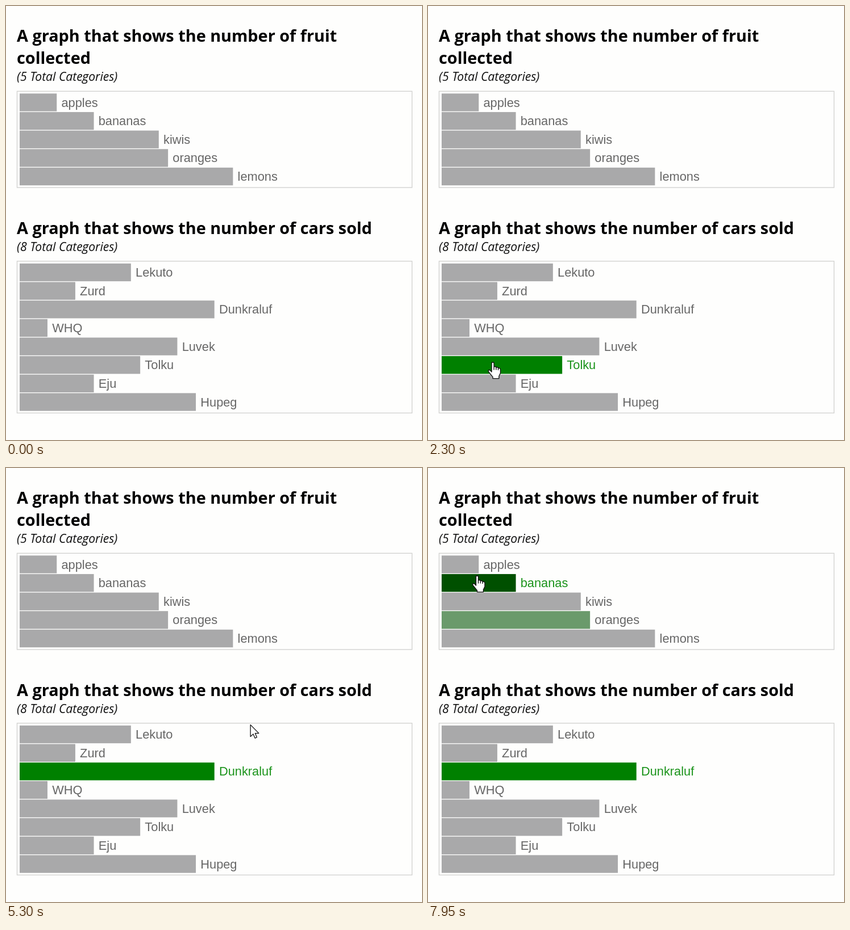
These frames come from a looping animation (732x765 px, 8 s). An HTML page:

```html
<!DOCTYPE html>
<html lang="en">
<head>
<meta charset="utf-8">
<title>Bar charts</title>
<style>
  html, body { margin: 0; width: 100%; height: 100%; overflow: hidden; background: #fefefd; }
  svg { display: block; }
  .title { font: bold 28.84px "Open Sans", "Noto Sans", sans-serif; fill: #000; }
  .sub { font: italic 21.2px "Open Sans", "Noto Sans", sans-serif; fill: #111; }
  .label { font: 21.8px "Liberation Sans", Arial, sans-serif; }
  .frame { fill: none; stroke: #d2d2d0; stroke-width: 1.36; }
  .cursor path { fill: #fff; stroke: #111; stroke-width: 1; stroke-linejoin: round; }
</style>
</head>
<body>
<svg width="732" height="765" viewBox="0 0 732 765">
  <text class="title" x="19" y="63">A graph that shows the number of fruit</text>
  <text class="title" x="19" y="102">collected</text>
  <text class="sub" x="19" y="132">(5 Total Categories)</text>
  <rect class="frame" x="19.5" y="150.3" width="695" height="169.7"/>
  <text class="title" x="19" y="401.5">A graph that shows the number of cars sold</text>
  <text class="sub" x="19" y="431.6">(8 Total Categories)</text>
  <rect class="frame" x="19.5" y="449.8" width="695" height="267.6"/>
  <g id="rows"></g>
  <g id="hand" class="cursor">
    <path transform="scale(1.36) translate(-6.5 -.5)" d="M5 1.7Q5 .5 6.5 .5Q8 .5 8 1.7V6.5Q9.3 5.5 10.6 6.5L10.8 7.3Q12.2 6.5 13.4 7.5L13.5 8.3Q16 7.6 16.4 9.7V14.5L14.5 18.5V21.5H6.5V19.5L1 12.8Q.2 10.7 1.8 10.4Q3 10.4 5 13ZM8 6.5V10.5M10.8 7.3V10.5M13.5 8.3V10.8"/>
  </g>
  <g id="arrow" class="cursor">
    <path transform="scale(1.3)" d="M.5 .5V16.5L4.2 13L6.7 18.6L9.2 17.5L6.8 12H11.8Z"/>
  </g>
</svg>
<script>
const LOOP = 8000, FADE = 250, LAG = 15, STEP = 5;
const LEFT = 24, UNIT = 16.32, PITCH = 2 * UNIT, BAR = 31.3;
const IDLE = 0, HOVER = 1, PICKED = 2;
const FILLS = [[169, 169, 170], [0, 0, 0], [0, 128, 0]];
const INKS = ['#666', '#181818', '#1a931a'];

const fruit = { apples: 4, bananas: 8, kiwis: 15, oranges: 16, lemons: 23 };
const cars = { Lekuto: 12, Zurd: 6, Dunkraluf: 21, WHQ: 3, Luvek: 17, Tolku: 13, Eju: 8, Hupeg: 19 };

const home = { x: 260, y: 775 };
const moves = [
  { from: 100, to: 900, x: 150, y: 702 },
  { from: 1555, to: 1905, x: 114, y: 628 },
  { from: 2300, to: 2530, x: 190, y: 775 },
  { from: 3300, to: 4020, x: 218, y: 532 },
  { from: 4300, to: 4850, x: 429.5, y: 452 },
  { from: 5300, to: 6050, x: 258.5, y: 265 },
  { from: 6950, to: 7400, x: 86.5, y: 190 }
];
const clicks = [2060, 4220, 6130, 7860];

const byId = id => document.getElementById(id);
const mix = (a, b, k) => a + (b - a) * k;

function add(tag, attrs) {
  const el = document.createElementNS('http://www.w3.org/2000/svg', tag);
  for (const key in attrs) el.setAttribute(key, attrs[key]);
  return byId('rows').appendChild(el);
}

function makeRows(data, top) {
  return Object.entries(data).map(([name, count], i) => {
    const y = top + i * PITCH, width = count * UNIT, end = LEFT + width;
    const bar = add('rect', { x: LEFT, y, width, height: BAR });
    const label = add('text', { class: 'label', x: end + 8.2, y: y + 23.2 });
    label.textContent = name;
    return { bar, label, y, end, data, steps: [] };
  });
}

const rows = [...makeRows(fruit, 154.3), ...makeRows(cars, 453.9)];

function pointer(t) {
  let { x, y } = home;
  for (const m of moves) {
    if (t <= m.from) break;
    const k = Math.min(1, (t - m.from) / (m.to - m.from));
    const s = k * k * (3 - 2 * k);
    x = mix(x, m.x, s);
    y = mix(y, m.y, s);
  }
  return { x, y };
}

function rowAt({ x, y }) {
  return rows.find(r => x > LEFT && x < r.end && y >= r.y && y < r.y + BAR);
}

// walk through the loop once and note when each row changes state
function recordSteps() {
  const picked = new Map();
  for (let t = 0; t < LOOP; t += STEP) {
    const hit = rowAt(pointer(t - LAG));
    if (hit && clicks.includes(t)) picked.set(hit.data, hit);
    for (const row of rows) {
      const state = picked.get(row.data) === row ? PICKED : row === hit ? HOVER : IDLE;
      const last = row.steps.at(-1);
      if (!last || last.state !== state) row.steps.push({ time: t, state });
    }
  }
}

// cubic-bezier(.25, .1, .25, 1)
function ease(x) {
  if (x >= 1) return 1;
  let lo = 0, hi = 1, s = 0.5;
  for (let i = 0; i < 20; i++) {
    s = (lo + hi) / 2;
    if (0.75 * s * (1 - s) + s ** 3 < x) lo = s; else hi = s;
  }
  return 0.3 * (1 - s) ** 2 * s + 3 * (1 - s) * s * s + s ** 3;
}

function rowLook(steps, t) {
  let from = FILLS[IDLE], state = IDLE, start = 0;
  const colorAt = time => {
    const k = ease((time - start) / FADE);
    return from.map((v, i) => mix(v, FILLS[state][i], k));
  };
  for (const next of steps) {
    if (next.time > t) break;
    from = colorAt(next.time);
    state = next.state;
    start = next.time;
  }
  return { fill: colorAt(t), state };
}

function show(id, { x, y }, visible) {
  const el = byId(id);
  el.setAttribute('transform', `translate(${x} ${y})`);
  el.setAttribute('visibility', visible ? 'visible' : 'hidden');
}

function draw(t) {
  for (const row of rows) {
    const { fill, state } = rowLook(row.steps, t);
    row.bar.setAttribute('fill', `rgb(${fill.map(Math.round)})`);
    row.label.setAttribute('fill', INKS[state]);
  }
  const tip = pointer(t), over = Boolean(rowAt(tip));
  show('hand', tip, over);
  show('arrow', tip, !over);
}

recordSteps();
const begin = performance.now();
function tick() {
  draw((performance.now() - begin) % LOOP);
  requestAnimationFrame(tick);
}
tick();
</script>
</body>
</html>
```
